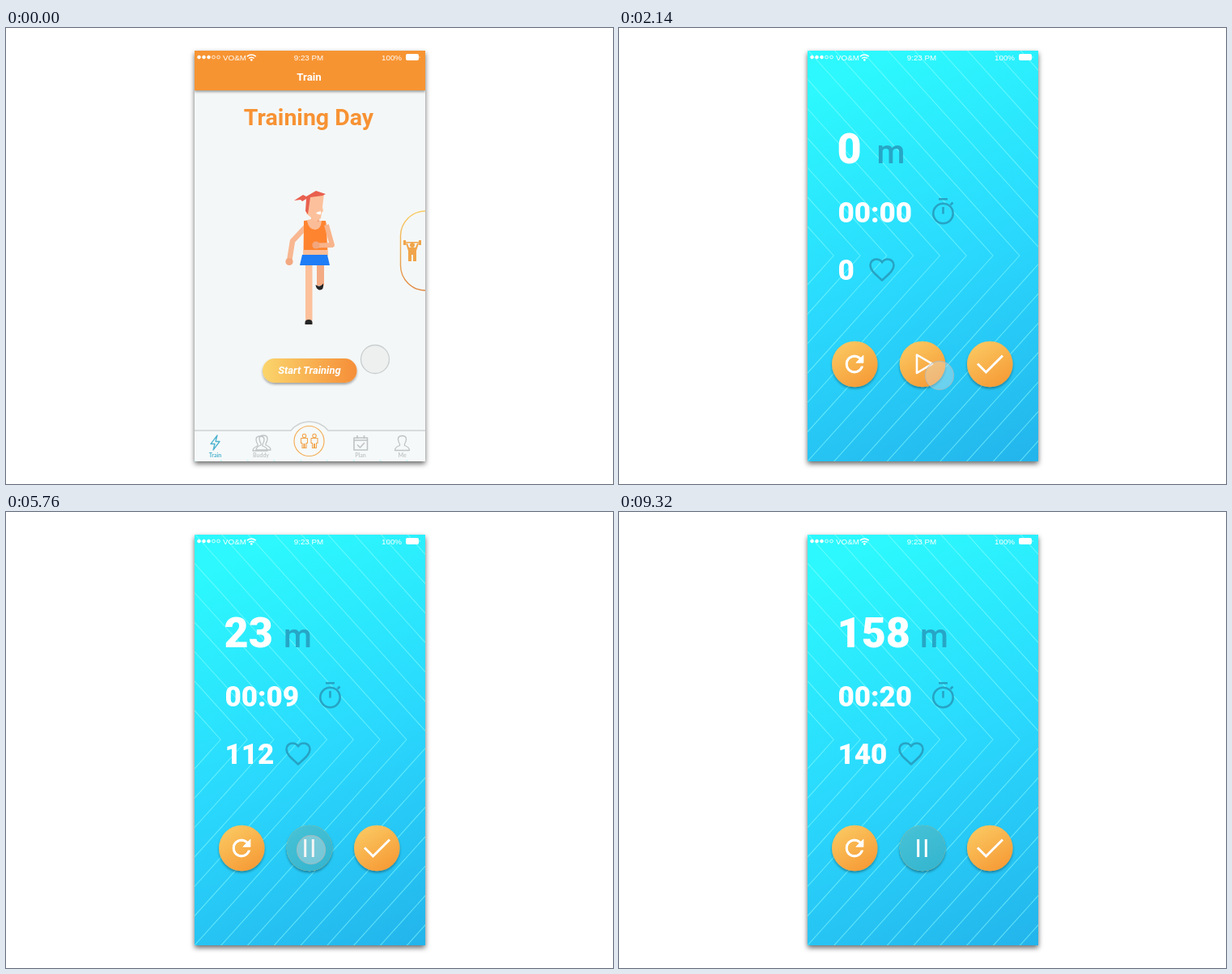
An HTML page for the animation above (9340 ms loop, 750 by 563 pixels).

```html
<!DOCTYPE html>
<html lang="en">
<head>
<meta charset="utf-8">
<title>Training tracker</title>
<style>
  html, body { margin: 0; width: 100%; height: 100%; overflow: hidden; background: #fff; }
  svg { display: block; width: 100vw; height: 100vh; }
  text { font-family: Roboto, Inter, sans-serif; font-weight: 700; }
  .status text { font: 400 9.8px "Liberation Sans", Arial, sans-serif; fill: #fff; }
  .tabs text { font: 700 7px Lato, "Open Sans", sans-serif; text-anchor: middle; fill: #c3c7c9; }
  .num { font-weight: 900; fill: #fff; }
  .line { fill: none; stroke-linejoin: round; }
</style>
</head>
<body>
<svg viewBox="0 0 750 563">
  <defs>
    <linearGradient id="sea" gradientUnits="userSpaceOnUse" x1="285" y1="60" x2="500" y2="535">
      <stop offset="0" stop-color="#2cf8fd"/><stop offset=".5" stop-color="#2ad8fd"/><stop offset="1" stop-color="#23b5ec"/>
    </linearGradient>
    <linearGradient id="amber" x1=".15" y1="0" x2=".75" y2="1">
      <stop offset="0" stop-color="#fbca63"/><stop offset="1" stop-color="#f69a35"/>
    </linearGradient>
    <linearGradient id="teal" x1="0" y1="0" x2=".6" y2="1">
      <stop offset="0" stop-color="#48c3d6"/><stop offset="1" stop-color="#36b6d0"/>
    </linearGradient>
    <linearGradient id="pill">
      <stop offset="0" stop-color="#fbd56c"/><stop offset="1" stop-color="#f58e38"/>
    </linearGradient>
    <linearGradient id="rim" x2="0" y2="1">
      <stop offset="0" stop-color="#f9cc62"/><stop offset="1" stop-color="#e08a45"/>
    </linearGradient>
    <clipPath id="screen"><rect x="233" y="28" width="285" height="507"/></clipPath>
    <filter id="drop" x="-20%" y="-20%" width="140%" height="150%">
      <feDropShadow dx="0" dy="2" stdDeviation="1.6" flood-opacity=".35"/>
    </filter>
    <filter id="glow" x="-10%" y="-10%" width="120%" height="120%">
      <feDropShadow dx="0" dy="3" stdDeviation="3.2" flood-opacity=".6"/>
    </filter>
    <path id="refresh" transform="translate(274.2 398.2) scale(1.4)" fill="#fff" d="M17.65 6.35C16.2 4.9 14.21 4 12 4c-4.42 0-7.99 3.58-7.99 8s3.57 8 7.99 8c3.73 0 6.84-2.55 7.73-6h-2.08c-.82 2.33-3.04 4-5.65 4-3.31 0-6-2.69-6-6s2.69-6 6-6c1.66 0 3.14.69 4.22 1.78L13 11h7V4z"/>
    <path id="bust" class="line" stroke-width="1.3" d="M-9 9Q-9 5 -3 3V1Q-5 -2 -5 -5Q-5 -9 0 -9Q5 -9 5 -5Q5 -2 3 1V3Q9 5 9 9Z"/>
    <g id="mate">
      <circle cy="-6" r="2.2"/><path d="M-4-3H4V3H2.5V9H.5V4H-.5V9H-2.5V3H-4Z"/>
    </g>
  </defs>

  <rect x="233" y="28" width="285" height="507" fill="#f4f7f7" filter="url(#glow)"/>

  <g clip-path="url(#screen)">
    <text x="374" y="119.5" font-size="28.5" text-anchor="middle" fill="#f79233">Training Day</text>
    <rect x="233" y="20" width="285" height="57" fill="#f79433" filter="url(#drop)"/>
    <text x="374.5" y="65" font-size="13.3" text-anchor="middle" fill="#fff">Train</text>

    <g id="runner">
      <path d="M370 246L354 263L350 288" class="line" stroke="#f8b791" stroke-width="6.5"/>
      <circle cx="350" cy="288.5" r="4.6" fill="#f3a880"/>
      <path d="M384 290H393V318H384Z" fill="#f3ab84"/>
      <path d="M382.500 317Q388 321 392 315.500Q393 324 387 323.500Q383 322 382.500 317Z" fill="#262626"/>
      <path d="M370 290H378.500V361H370Z" fill="#fcc09b"/>
      <path d="M369.500 366V363Q370 360 374 360Q378 360 378.500 363V366Z" fill="#262626"/>
      <path d="M368 238L377 236V228H386V237L396 240L398 281H367Z" fill="#fbbd97"/>
      <path d="M377 229L386 240L387 235Z" fill="#ee9d76"/>
      <path d="M368 238H372Q374 249 382 249Q389 249 390 238H395L397 274H368Z" fill="#ff8430"/>
      <path d="M396 243L403 268L384 268.500" class="line" stroke="#f8b48c" stroke-width="6"/>
      <circle cx="383" cy="268" r="4.600" fill="#f3a67c"/>
      <path d="M366 280H397L400 293H363Z" fill="#1f7df6"/>
      <path d="M374 207L393 204L391 221L392 226L390 228L389 235L383 239L371 229Z" fill="#fcc19c"/>
      <path d="M383 228L389 226V230Q385 231 383 228Z" fill="#fff"/>
      <path d="M356 213L367 206L371 208L383 201L395 205L391 207L376 209L373 230L370 226L371 211L366 214L364 212Z" fill="#e9604f"/>
    </g>

    <rect x="487.500" y="226" width="70" height="98" rx="31" class="line" stroke="url(#rim)" stroke-width="1.4"/>
    <g fill="#f0a54b">
      <circle cx="502" cy="268" r="3"/>
      <path d="M491 264H513V265.500H491ZM491 262H494V268H491ZM510 262H513V268H510ZM494 266H496L498 271H506L508 266H510L507 275V288H503V280H501V288H497V275Z"/>
    </g>

    <g filter="url(#drop)"><rect x="317" y="408" width="116.500" height="30" rx="15" fill="url(#pill)"/></g>
    <text x="375" y="427" font-size="13" font-style="italic" text-anchor="middle" fill="#fff">Start Training</text>

    <g class="tabs">
      <path d="M230 497H352Q361 486 375 486Q389 486 398 497H520V540H230Z" fill="#f6f9f9" stroke="#cfd3d4" stroke-width="1.5"/>
      <circle cx="374.500" cy="510" r="18.500" class="line" stroke="#f4ae59" stroke-width="1.200"/>
      <g class="line" stroke="#f2a54e" stroke-width="1.100">
        <use href="#mate" x="368.500" y="509.500"/><use href="#mate" x="381" y="509.500"/>
      </g>
      <path d="M261 503L253 513.500H258L256 521L264 510.500H259Z" class="line" stroke="#4fb3cf" stroke-width="1.300"/>
      <g stroke="#bfc3c5">
        <use href="#bust" x="318" y="512"/>
        <g fill="#f6f9f9"><use href="#bust" x="314" y="513"/></g>
        <use href="#bust" x="489.500" y="512.500"/>
        <path d="M430 506H446.500V521H430ZM430 509H446.500M434 503V507M442.500 503V507M434 514.500L437.500 518L443 512" class="line" stroke-width="1.600"/>
      </g>
      <text x="258.500" y="530" style="fill:#4fb3cf">Train</text>
      <text x="315" y="530">Buddy</text>
      <text x="438" y="530">Plan</text>
      <text x="489.500" y="530">Me</text>
    </g>

    <g id="panel">
      <rect x="233" y="28" width="285" height="507" fill="url(#sea)"/>
      <path id="chevrons" class="line" stroke="#8dffff" stroke-opacity=".55" stroke-width="1.100"/>
      <text id="metres" class="num" x="269.500" y="167" font-size="52"></text>
      <text id="unit" y="166.500" font-size="40" style="font-weight:500" fill="#27a6c6">m</text>
      <text id="clock" class="num" x="270.500" y="239.500" font-size="35"></text>
      <text id="pulse" class="num" x="270.500" y="311" font-size="35"></text>
      <g class="line" stroke="#27a3c4" stroke-width="2.600">
        <path d="M395 211.300H406M400.500 221V229.500M409.500 218.500L412.500 215.500"/>
        <circle cx="400.500" cy="229" r="12.200"/>
        <path id="heart" d="M0 13L-2.500 10.700C-10 4-14.500 0-14.500-5.500C-14.500-10-11-13-7-13C-4-13-1.500-11.500 0-9.200C1.500-11.500 4-13 7-13C11-13 14.500-10 14.500-5.500C14.500 0 10 4 2.500 10.700Z"/>
      </g>
      <g filter="url(#drop)">
        <circle cx="291.300" cy="415" r="28.300" fill="url(#amber)"/>
        <circle cx="375" cy="415" r="28.300" fill="url(#amber)"/>
        <circle id="tealDisc" cx="375" cy="415" r="28.300" fill="url(#teal)"/>
        <circle cx="458.300" cy="415" r="28.300" fill="url(#amber)"/>
      </g>
      <use href="#refresh"/>
      <g class="line" stroke="#fff" stroke-width="2.600">
        <path id="play" d="M368 403.500V426L387 414.700Z"/>
        <path id="pause" d="M369.700 404V426M379.300 404V426" stroke-width="3"/>
        <path d="M443 414.500L453.500 425L474 404.500" stroke-width="3" style="stroke-linejoin:miter"/>
      </g>
    </g>
    <use id="ghost" href="#refresh"/>

    <g class="status">
      <g id="dots" stroke="#fff" stroke-width=".8"></g>
      <text x="268" y="40">VO&amp;M</text>
      <g class="line" stroke="#fff" stroke-width="1.500">
        <path d="M297.800 35.200Q303.300 30.700 308.800 35.200M300 37.500Q303.300 34.800 306.600 37.500"/>
        <circle cx="303.300" cy="39.400" r=".6"/>
      </g>
      <text x="374" y="40" text-anchor="middle">9:23 PM</text>
      <text x="464" y="40">100%</text>
      <rect x="494" y="32" width="16" height="8" rx="2" fill="#fff"/>
      <path d="M510.800 34.500Q512.300 36 510.800 37.500Z" fill="#fff"/>
    </g>

    <circle id="finger" r="17.500" fill="#e2e4e4" fill-opacity=".36" stroke="#b4babc" stroke-opacity=".65" stroke-width="1.300"/>
  </g>
</svg>

<script>
const LOOP = 9340, RUN = 3600;
const $ = id => document.getElementById(id);

const smooth = u => u * u * (3 - 2 * u);
const linear = u => u;
const easeOut = u => 1 - (1 - u) ** 3;

// Value at t along a table of [time, value] steps.
function track(t, steps, ease = smooth) {
  if (t <= steps[0][0]) return steps[0][1];
  for (let i = 1; i < steps.length; i++) {
    const [t0, a] = steps[i - 1], [t1, b] = steps[i];
    if (t < t1) return a + (b - a) * ease((t - t0) / (t1 - t0));
  }
  return steps[steps.length - 1][1];
}

const accel = t => Math.max(0, t - RUN) ** 2;
const distance = [[RUN, 0], [4840, 6.3], [6900, 56.4], [9320, 158.2]].map(([t, v]) => [accel(t), v]);
const seconds = [[RUN, 0], [4840, 5.4], [6900, 14.4], [9320, 20.2]];
const beats = [[RUN, 0], [3900, 88], [4840, 102.4], [6900, 124.4], [9320, 140.2]];
const slide = [[803, 507], [1163, 0]];
const unitX = [[5000, 318.5], [5400, 343], [7900, 343], [8300, 372]];
const heartX = [[RUN, 325], [4000, 356], [4840, 356], [5100, 361]];
const fingerX = [[100, 456], [550, 396], [2500, 396], [3000, 377], [6400, 377], [6850, 396]];
const fingerY = [[100, 409], [550, 429], [2500, 429], [3000, 417], [6400, 417], [6850, 409]];
const fingerFade = [[7000, 1], [7300, 0]];
const tap = [[580, 1], [670, .88], [780, 1], [3380, 1], [3470, .88], [3580, 1]];
const running = [[3480, 0], [3640, 1]];

let lines = "";
for (let k = 0; k < 17; k++) {
  const x = 232.500 + k * 32.8;
  lines += `M${x - 230} 26L${x} 281L${x - 230} 536`;
}
$("chevrons").setAttribute("d", lines);

$("dots").innerHTML = [0, 1, 2, 3, 4].map(i =>
  `<circle cx="${238.5 + i * 6}" cy="36" r="1.900" fill="${i < 3 ? "#fff" : "none"}"/>`).join("");

function draw(t) {
  const y = track(t, slide, easeOut);
  $("panel").setAttribute("transform", `translate(0 ${y})`);
  $("ghost").setAttribute("opacity", y < 380 ? 1 : 0);

  const s = Math.floor(track(t, seconds, linear));
  $("metres").textContent = Math.floor(track(accel(t), distance, linear));
  $("clock").textContent = "00:" + String(s).padStart(2, "0");
  $("pulse").textContent = Math.floor(track(t, beats, linear));
  $("unit").setAttribute("x", track(t, unitX));
  $("heart").setAttribute("transform", `translate(${track(t, heartX)} 298.500)`);

  const on = track(t, running);
  $("tealDisc").setAttribute("opacity", on);
  $("pause").setAttribute("opacity", on);
  $("play").setAttribute("opacity", 1 - on);

  const finger = $("finger");
  finger.setAttribute("transform",
    `translate(${track(t, fingerX)} ${track(t, fingerY)}) scale(${track(t, tap)})`);
  finger.setAttribute("opacity", track(t, fingerFade));
}

const start = performance.now();
function tick() {
  draw((performance.now() - start) % LOOP);
  requestAnimationFrame(tick);
}
tick();
</script>
</body>
</html>
```
